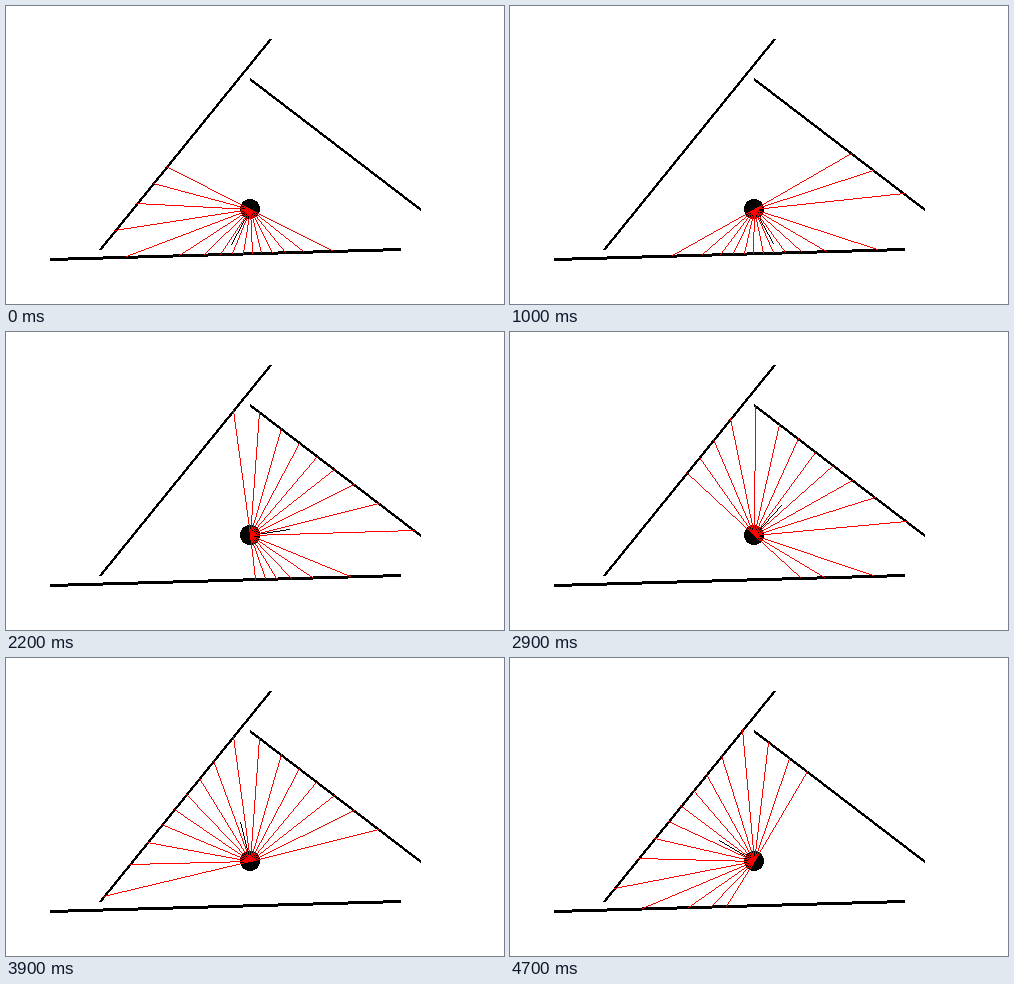
These frames come from a looping animation (498 by 298 pixels, 4800 ms). An HTML page with a canvas:

```html
<!DOCTYPE html>
<html>
<head>
<meta charset="utf-8">
<title>Ray sensor sweep</title>
<style>
html, body { margin: 0; width: 100%; height: 100%; overflow: hidden; background: #fff; }
canvas { display: block; }
</style>
</head>
<body>
<canvas id="stage" width="498" height="298"></canvas>
<script>
const ctx = document.getElementById('stage').getContext('2d');
const RAD = Math.PI / 180;
const LOOP = 4800, TICK = 100;
const START = 116.85, TURN = -5.656;   // heading and turn per tick, degrees
const RAY_GAP = 12, RADIUS = 10, POINTER = 40;
const cx = 244, cy = 203;
const walls = [
  [94, 243, 264, 33],
  [244, 73, 414, 203],
  [44, 253, 394, 243]
];

// Hard-edged line; width is measured along the minor axis.
function line(x0, y0, x1, y1, color, width = 1) {
  const dx = x1 - x0, dy = y1 - y0;
  const steep = Math.abs(dy) > Math.abs(dx);
  const n = Math.max(Math.abs(dx), Math.abs(dy));
  const shift = width >> 1;
  ctx.fillStyle = color;
  for (let i = 0; i <= n; i++) {
    const x = Math.round(x0 + dx * i / n), y = Math.round(y0 + dy * i / n);
    if (steep) ctx.fillRect(x - shift, y, width, 1);
    else ctx.fillRect(x, y - shift, 1, width);
  }
}

function disc() {
  ctx.fillStyle = '#000';
  for (let row = -RADIUS; row < RADIUS; row++) {
    const half = Math.round(Math.sqrt(RADIUS ** 2 - (row + 0.5) ** 2));
    ctx.fillRect(cx - half, cy + row, 2 * half, 1);
  }
}

// Distance from the centre to a wall along a direction, or Infinity.
function distance([x0, y0, x1, y1], ux, uy) {
  const wx = x1 - x0, wy = y1 - y0, px = x0 - cx, py = y0 - cy;
  const det = ux * wy - uy * wx;
  const dist = (px * wy - py * wx) / det;
  const along = (px * uy - py * ux) / det;
  return dist > 0 && along >= 0 && along <= 1 ? dist : Infinity;
}

function spoke(ux, uy, length, color) {
  line(cx, cy, Math.trunc(cx + ux * length), Math.trunc(cy + uy * length), color);
}

function draw(time) {
  const heading = START + TURN * Math.floor(time % LOOP / TICK);
  ctx.fillStyle = '#fff';
  ctx.fillRect(0, 0, 498, 298);
  for (const wall of walls) line(...wall, '#000', 3);
  disc();
  spoke(Math.cos(heading * RAD), Math.sin(heading * RAD), POINTER, '#000');
  for (let a = -90; a <= 90; a += RAY_GAP) {
    const ux = Math.cos((heading + a) * RAD), uy = Math.sin((heading + a) * RAD);
    const reach = Math.min(...walls.map(wall => distance(wall, ux, uy)));
    if (reach < Infinity) spoke(ux, uy, reach, '#f00');
  }
}

const begin = performance.now();
function loop() {
  draw(performance.now() - begin);
  requestAnimationFrame(loop);
}
loop();
</script>
</body>
</html>
```
